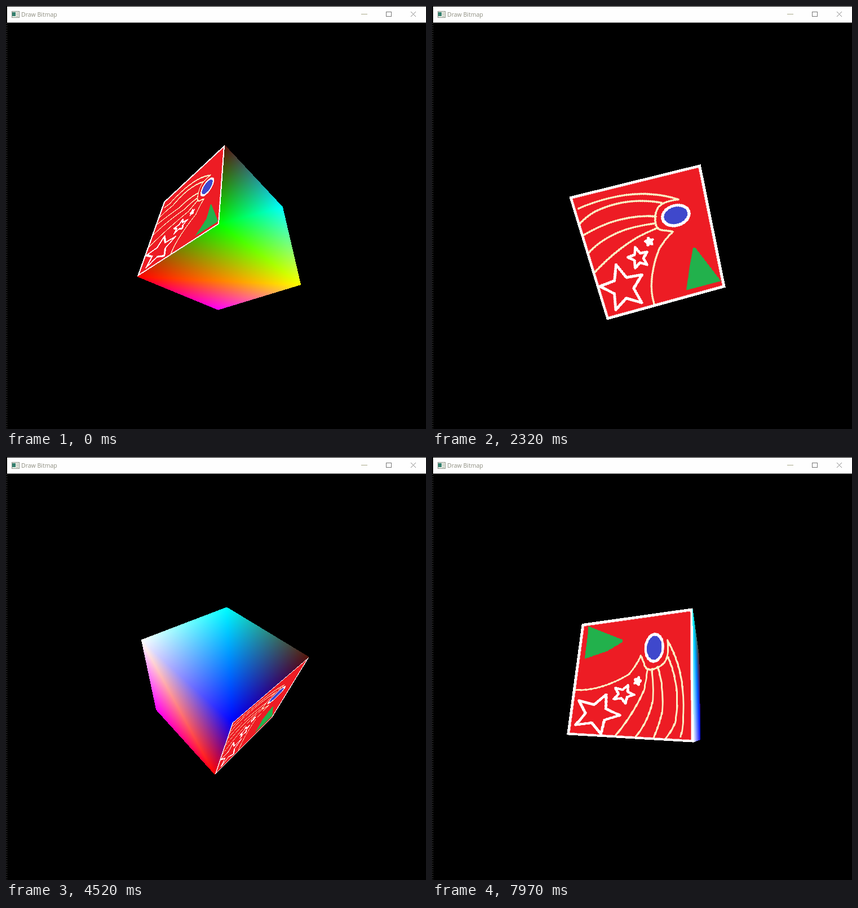
These frames come from a looping animation (745 px wide and 751 px high, 8 s). An HTML page with a canvas:

```html
<!DOCTYPE html>
<html lang="en">
<head>
<meta charset="utf-8">
<title>Draw Bitmap</title>
<style>
  html, body { margin: 0; width: 100%; height: 100%; overflow: hidden; background: #000; }
  canvas, svg { position: absolute; left: 0; top: 0; display: block; }
  text { font: 10.5px "Open Sans", "Noto Sans", sans-serif; fill: #8e8e80; }
</style>
</head>
<body>
<canvas id="stage" width="745" height="751"></canvas>
<svg width="745" height="751" fill="none">
  <path d="M1.5 30V751" stroke="#444" stroke-dasharray="2 2"/>
  <rect x="2" y="1" width="743" height="28.5" fill="#fefefe"/>
  <rect x="10.5" y="9.5" width="13" height="11" fill="#eef0e8" stroke="#8b948b"/>
  <rect x="11" y="11" width="6" height="7" fill="#35806f"/>
  <path d="M18 12.5h4M18 15.5h4M18 18.5h4" stroke="#a3aca0"/>
  <text x="27" y="19">Draw Bitmap</text>
  <path d="M630 14.5h11" stroke="#a9a98a"/>
  <rect x="674.5" y="10.5" width="9" height="8" stroke="#777"/>
  <path d="M718 10l9 9M727 10l-9 9" stroke="#888"/>
</svg>
<script>
const LOOP = 8000, SIZE = 256, RAD = Math.PI / 180;
const CENTER = [381.5, 409.1], SCALE = 173.1, DEPTH = 0.4947;

// The cube turns about one fixed axis; the other two vectors span its plane of rotation.
const SPIN = [0.613, 0.789, -0.03], SIDE = [0.79, -0.613, 0], FRONT = [0.018, 0.024, 1];
// Each cube edge: part along the axis, radius around it, phase in degrees.
const EDGES = [[0.79, 0.613, 92], [0.612, 0.791, -91.1], [0.025, 1, 0]];

// Turning slows and quickens a little: time in ms, angle in degrees.
const TURN = [[0, 58], [830, 30.9], [2320, -8.1], [3200, -27.7], [4520, -67], [6680, -118.3], [7970, -157.9]];

// Corner index bits: 1 = right, 2 = top, 4 = back.
const COLORS = ['red', 'lime', 'blue', '#581106', 'magenta', 'yellow', 'white', 'cyan'];
// Corners run clockwise; each face is split from its first corner to its third.
const TEXTURED = ['2310', '5764'], SHADED = ['7513', '0154', '7326', '6204'];

function makeTexture() {
  const canvas = document.createElement('canvas');
  canvas.width = canvas.height = SIZE;
  const g = canvas.getContext('2d');
  g.scale(SIZE, SIZE);
  g.lineJoin = g.lineCap = 'round';

  const stroke = (path, color, width) => {
    g.strokeStyle = color;
    g.lineWidth = width;
    g.stroke(path);
  };
  const fill = (path, color) => {
    g.fillStyle = color;
    g.fill(path);
  };
  const star = (x, y, radius) => {
    const path = new Path2D();
    for (let i = 0; i < 10; i++) {
      const r = i % 2 ? radius * 0.46 : radius, a = (i * 36 - 90) * RAD;
      path.lineTo(x + r * Math.cos(a), y + r * Math.sin(a));
    }
    path.closePath();
    return path;
  };

  g.fillStyle = '#ed1c24';
  g.fillRect(0, 0, 1, 1);

  const streaks = new Path2D(`
    M.043 .108 C.29 .07 .54 .07 .788 .23
    C.64 .21 .6 .25 .586 .366 C.585 .45 .64 .43 .7 .47 C.57 .54 .4 .78 .406 .99
    M.022 .221 C.2 .12 .45 .12 .66 .224
    M.011 .319 C.2 .27 .42 .25 .599 .318
    M.008 .466 C.18 .36 .4 .345 .589 .371
    M.012 .622 C.17 .53 .35 .45 .595 .41`);
  stroke(streaks, '#fbf1c4', 0.015);

  fill(new Path2D('M.822 .633 H.838 L.976 .943 L.688 .94 L.769 .773Z'), '#22b14c');

  stroke(star(0.203, 0.791, 0.186), '#fff', 0.022);
  stroke(star(0.394, 0.6, 0.085), '#fff', 0.021);
  const smallStar = star(0.513, 0.5, 0.03);
  stroke(smallStar, '#fff', 0.02);
  fill(smallStar, '#fff');

  const ball = new Path2D();
  ball.ellipse(0.745, 0.348, 0.1, 0.079, 0, 0, 2 * Math.PI);
  fill(ball, '#3f48cc');
  stroke(ball, '#fff', 0.023);

  stroke(new Path2D('M0 0H1V1H0Z'), '#fff', 0.042);
  return new Uint32Array(g.getImageData(0, 0, SIZE, SIZE).data.buffer);
}

const ctx = document.getElementById('stage').getContext('2d');
const { width, height } = ctx.canvas;
const image = ctx.createImageData(width, height);
const pixels = new Uint32Array(image.data.buffer);
const BLACK = 0xff000000;
const texture = makeTexture();

const texel = (u, v) => {
  const at = n => Math.max(0, Math.min(SIZE - 1, Math.floor(n * SIZE)));
  return texture[at(v) * SIZE + at(u)];
};
const rgb = (r, g, b) => (BLACK | b << 16 | g << 8 | r) >>> 0;

const cornerColors = COLORS.map(color => {
  ctx.fillStyle = color;
  const hex = parseInt(ctx.fillStyle.slice(1), 16);
  return [hex >> 16, hex >> 8 & 255, hex & 255];
});

function angleAt(t) {
  const i = TURN.findIndex(([time]) => time > t);
  const next = i < 0 ? TURN.length - 1 : i;
  const [t0, a0] = TURN[next - 1], [t1, a1] = TURN[next];
  return a0 + (a1 - a0) * (t - t0) / (t1 - t0);
}

function projectCorners(angle) {
  const edges = EDGES.map(([along, radius, phase]) => {
    const a = (angle + phase) * RAD;
    return SPIN.map((n, i) => along * n + radius * (Math.sin(a) * SIDE[i] + Math.cos(a) * FRONT[i]));
  });
  return cornerColors.map((color, c) => {
    const [x, y, z] = [0, 1, 2].map(i =>
      edges.reduce((sum, e, bit) => sum + (c >> bit & 1 ? 0.5 : -0.5) * e[i], 0));
    const scale = SCALE / (1 + DEPTH * z);
    return {
      x: CENTER[0] + x * scale, y: CENTER[1] - y * scale,
      color, uv: [c & 1, 1 - (c >> 1 & 1), 0]
    };
  });
}

const cross = (a, b, x, y) => (b.x - a.x) * (y - a.y) - (b.y - a.y) * (x - a.x);

// Values are blended linearly on screen, without perspective correction.
function fillTriangle(a, b, c, key, shade) {
  const area = cross(a, b, c.x, c.y);
  if (area <= 0) return;
  const xs = [a.x, b.x, c.x], ys = [a.y, b.y, c.y];
  const left = Math.floor(Math.min(...xs)), right = Math.ceil(Math.max(...xs));
  const top = Math.floor(Math.min(...ys)), bottom = Math.ceil(Math.max(...ys));
  const A = a[key], B = b[key], C = c[key];
  for (let y = top; y < bottom; y++) {
    for (let x = left; x < right; x++) {
      const p = cross(b, c, x + 0.5, y + 0.5) / area;
      const q = cross(c, a, x + 0.5, y + 0.5) / area;
      const r = 1 - p - q;
      if (p < 0 || q < 0 || r < 0) continue;
      pixels[y * width + x] = shade(
        p * A[0] + q * B[0] + r * C[0],
        p * A[1] + q * B[1] + r * C[1],
        p * A[2] + q * B[2] + r * C[2]);
    }
  }
}

function drawFaces(faces, corners, key, shade) {
  for (const face of faces) {
    const [a, b, c, d] = [...face].map(i => corners[i]);
    fillTriangle(a, b, c, key, shade);
    fillTriangle(a, c, d, key, shade);
  }
}

function draw() {
  const corners = projectCorners(angleAt(performance.now() % LOOP));
  pixels.fill(BLACK);
  drawFaces(SHADED, corners, 'color', rgb);
  drawFaces(TEXTURED, corners, 'uv', texel);
  ctx.putImageData(image, 0, 0);
  requestAnimationFrame(draw);
}
draw();
</script>
</body>
</html>
```
